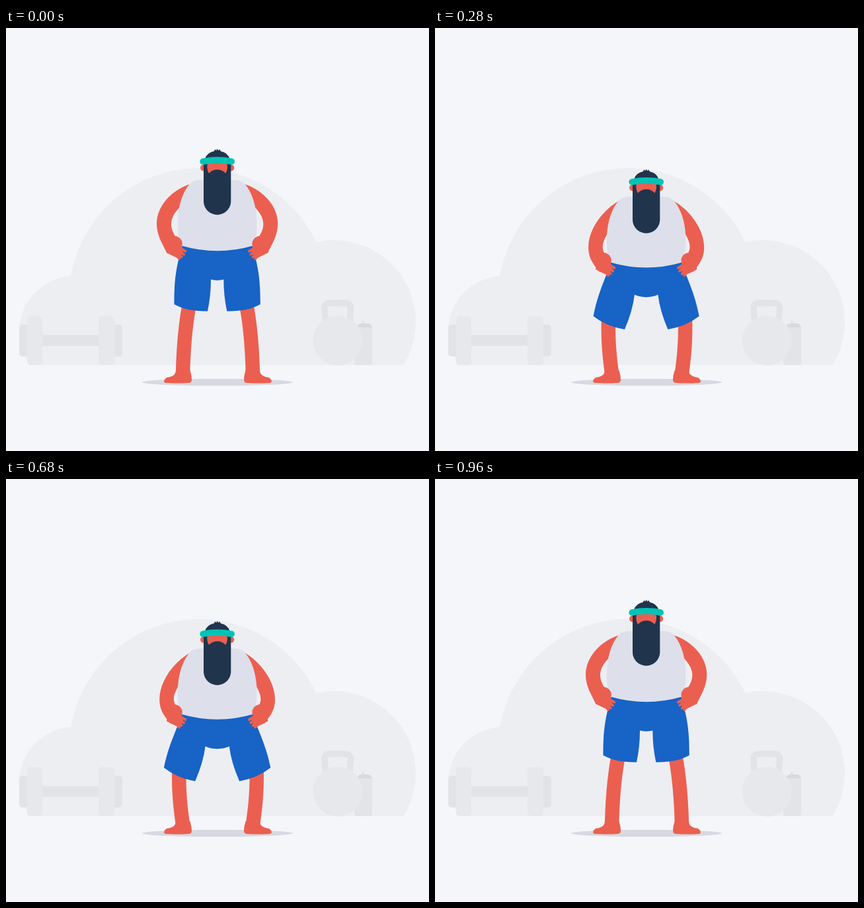
Write an HTML page that moves like this. It is 640 px wide and 640 px high and loops after 1200 ms.

```html
<!DOCTYPE html>
<html lang="en">
<head>
<meta charset="utf-8">
<title>Squats</title>
<style>
  html, body { margin: 0; width: 100%; height: 100%; overflow: hidden; background: #f4f6fa; }
  svg { display: block; width: 100%; height: 100%; }
  .skin { fill: #eb5f50; }
  .limb { fill: none; stroke: #eb5f50; }
  .dark { fill: #20344c; }
</style>
</head>
<body>
<svg viewBox="0 0 640 640">
  <clipPath id="ground"><path d="M0 0H640V510H0Z"/></clipPath>
  <g fill="#edeef2" clip-path="url(#ground)">
    <circle cx="104" cy="459" r="84"/>
    <circle cx="292" cy="408.7" r="196.7"/>
    <circle cx="496" cy="445" r="124"/>
  </g>

  <!-- dumbbell -->
  <g fill="#e2e3e6">
    <rect x="20" y="449" width="18" height="48" rx="5"/>
    <rect x="158" y="449" width="18" height="48" rx="5"/>
    <path d="M50 464.500H145V481H50Z"/>
  </g>
  <g fill="#e7e8eb">
    <rect x="32" y="436" width="23" height="74" rx="5"/>
    <rect x="140" y="436" width="24" height="74" rx="5"/>
  </g>

  <!-- can and kettlebell -->
  <path d="M527 452H554V506Q554 510 550 510H531Q527 510 527 506Z" fill="#e3e4e7"/>
  <path d="M531 453Q532 447 537 447H548Q552 447 554 453Z" fill="#d9dade"/>
  <path d="M538 447V444Q540 441 542 444V447Z" fill="#e3e4e7"/>
  <path d="M483.500 445L482 424Q481.500 416 490 416H513Q521.500 416 521.500 424L520 445" fill="none" stroke="#e2e3e6" stroke-width="9.500"/>
  <circle cx="502" cy="473" r="37.500" fill="#e7e8eb"/>

  <ellipse cx="320" cy="536" rx="114" ry="5.300" fill="#d8d9e0"/>

  <g id="leg">
    <path class="limb" id="shin" stroke-width="21.500"/>
    <path class="skin" d="M257 518C256.500 525 252 527 245 528.500Q242 528.500 241.500 530.500Q239.500 531 239.500 533Q238 536.500 242 537Q260 538 276 537Q281 537 281 532Q281 526 278.500 518Z"/>
  </g>
  <use href="#leg" transform="translate(641) scale(-1 1)"/>

  <g id="side">
    <path class="skin" id="arm"/>
    <path id="shorts" fill="#1763c6"/>
  </g>
  <use href="#side" transform="translate(639.300) scale(-1 1)"/>

  <g data-dy="28">
    <path fill="#dddfeb" d="M277.500 236.500Q283 230 293 230H346.300Q356 230 361.800 236.500Q377 255 379.300 288Q380.500 318 373.300 329.500Q319.700 345 266 329.500Q258.800 318 260 288Q262.300 255 277.500 236.500Z"/>
    <g id="hand">
      <path class="skin" d="M254 314.500C263 314.500 269 323 266 330L268 340L261 349L243 340L247 318Z"/>
      <path class="limb" stroke-width="4" stroke-linecap="round" d="M256 342L262 349M258 340L265.500 346.500M260 336L269 342.500M260 331L271.300 337.700"/>
    </g>
    <use href="#hand" transform="translate(639.300) scale(-1 1)"/>
  </g>

  <g class="skin" data-dy="33.500">
    <circle cx="299" cy="211.500" r="5"/>
    <circle cx="340.300" cy="211.500" r="5"/>
  </g>
  <path class="dark" id="beard"/>
  <path class="skin" data-dy="33" d="M305.500 203Q302.500 213 307 220Q312 214.300 319.700 214.300Q327.500 214.300 332.300 220Q336.800 213 333.800 203Z"/>
  <path class="dark" data-dy="34" d="M301 198Q304 188.500 314.500 186.500L316.500 183.500L318 185.500L319.700 182.800L321.300 185.500L323 183.500L325 186.500Q335.500 188.500 338.500 198Z"/>
  <path id="band" fill="none" stroke="#00c4b5" stroke-width="9.500" stroke-linecap="round"/>
</svg>
<script>
// Path pairs: standing, squatting
const poses = {
  shin: ['M278 415Q269 460 267.500 525', 'M261 440Q260 480 268 525'],
  arm: [
    'M279 236C250 245 228 270 228 296C228 315 238 328 243 340L256 346L256 315C248 302 246 289 262 272L275 250Z',
    'M279 264C255 278 232 308 232.500 337C233 354 241 361 248 371L256 374L256 343C253 337 253 330 260 317L275 278Z'
  ],
  shorts: [
    'M267 328C261 352 254 370 254.500 418Q274 429 305 428.500Q310 405 310 380.500Q315 381.800 320.500 381.800L320.500 328Z',
    'M266 356C262 374 246 400 238 438Q258 454 285 459Q298 430 301 406Q310 410 320.500 410L320.500 356Z'
  ],
  beard: [
    'M299 203L340.300 203L340.300 262C340.300 273 331 282.500 319.700 282.500C308 282.500 299 273 299 262Z',
    'M299 236L340.300 236L340.300 293C340.300 304 331 313.500 319.700 313.500C308 313.500 299 304 299 293Z'
  ],
  band: ['M298 202Q319.700 197.500 341.300 202', 'M298 236.300Q319.700 232 341.300 236.300']
};

const number = /[\d.]+/g;
function mix([a, b], p) {
  const ends = b.match(number);
  let i = 0;
  return a.replace(number, n => +n + (ends[i++] - n) * p);
}

function bezier(x1, y1, x2, y2) {
  const at = (a, b, s) => 3 * s * (1 - s) ** 2 * a + 3 * s * s * (1 - s) * b + s ** 3;
  return x => {
    let lo = 0, hi = 1;
    for (let i = 0; i < 30; i++) {
      const mid = (lo + hi) / 2;
      if (at(x1, x2, mid) < x) lo = mid; else hi = mid;
    }
    return at(y1, y2, lo);
  };
}

const down = bezier(.167, .167, .49, 1);
const up = bezier(.715, 0, .833, .833);

function squat(t) {
  if (t <= 0 || t >= 960) return 0;
  if (t < 400) return down(t / 400);
  return t <= 560 ? 1 : 1 - up((t - 560) / 400);
}

const shifted = document.querySelectorAll('[data-dy]');
const step = 40, loop = 1200;

function draw() {
  const t = Math.floor(performance.now() % loop / step) * step;
  const p = squat(t);
  for (const id in poses) document.getElementById(id).setAttribute('d', mix(poses[id], p));
  for (const el of shifted) el.setAttribute('transform', `translate(0 ${el.dataset.dy * p})`);
  requestAnimationFrame(draw);
}
draw();
</script>
</body>
</html>
```
